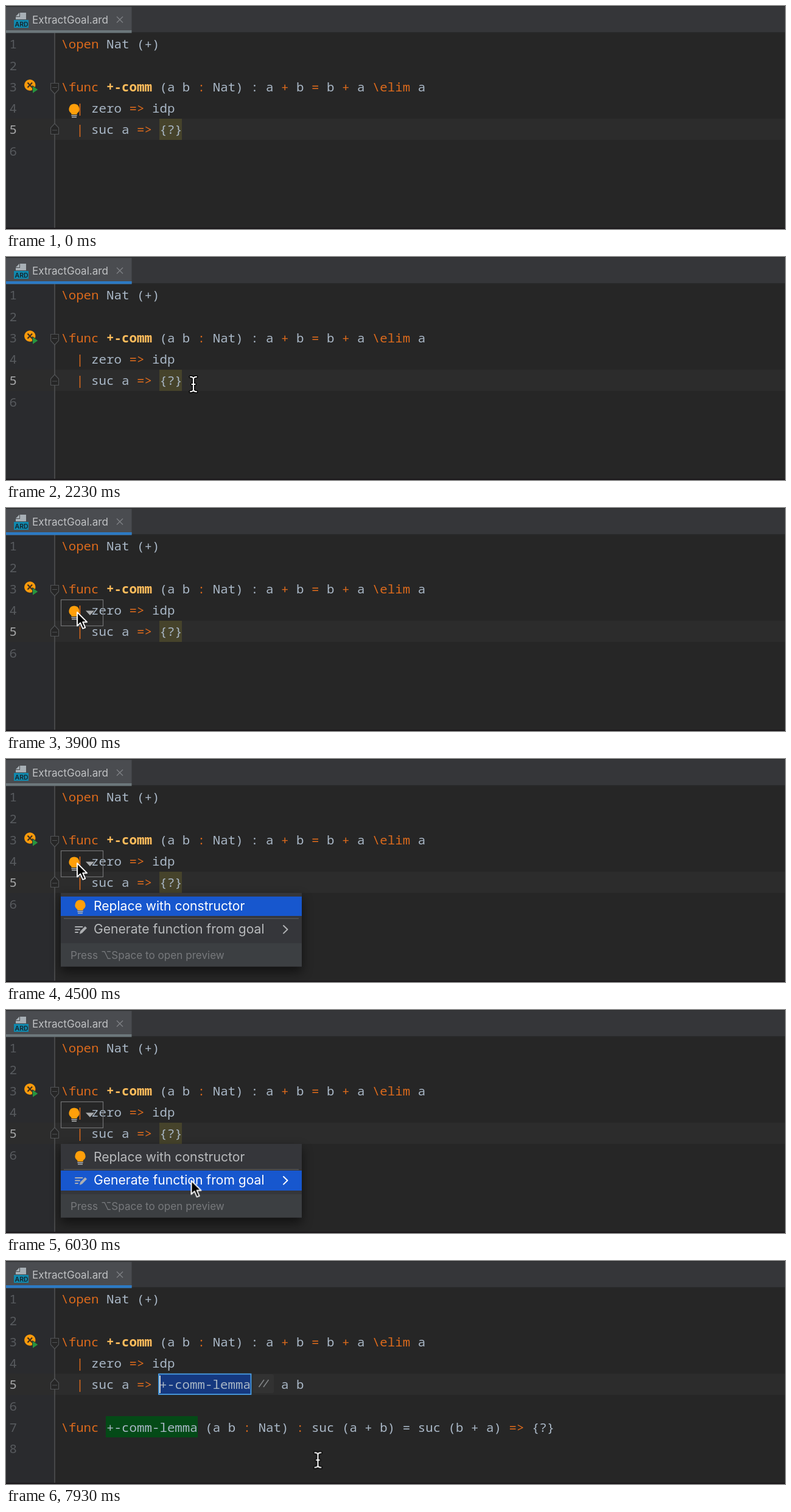
Recreate the animation shown at these times as an HTML page. Size 1280 px wide and 368 px high, loop 8 s.

```html
<!DOCTYPE html>
<html lang="en">
<head>
<meta charset="utf-8">
<title>Generate function from goal</title>
<style>
  html, body { margin: 0; width: 100%; height: 100%; overflow: hidden; background: #262626; }
  svg { display: block; width: 1280px; height: 368px; }
  text { white-space: pre; }
  .code text { font: 500 20.8px "Noto Sans Mono", monospace; fill: #a9b7c6; }
  .code .k { fill: #dc6a1c; }
  .code .f { fill: #ffbd5c; font-weight: 600; }
  .code .num { fill: #575a5e; font-weight: 400; }
  .code .now { fill: #a4a5a6; }
  .ui { font-family: Inter, sans-serif; font-size: 21.1px; fill: #b9bbbd; }
  .sel { fill: #fff; }
  .line { fill: none; stroke-linecap: round; stroke-linejoin: round; }
</style>
</head>
<body>
<svg viewBox="0 0 1280 368">
  <defs>
    <filter id="blur" x="-20%" y="-40%" width="140%" height="180%"><feGaussianBlur stdDeviation="9"/></filter>
    <g id="bulb">
      <path d="M0-9.5A8.6 8.6 0 0 1 4.6 6.3V8H-4.6V6.3A8.6 8.6 0 0 1 0-9.5Z" fill="#ff9f0a"/>
      <path d="M-4.6 9.8H4.6M-4 12.6H4" stroke="#b4b6b8" stroke-width="1.5"/>
    </g>
    <g id="edit" class="line" stroke="#aeb0b3" stroke-width="1.9">
      <path d="M-9-5H2.5M-9-.5H-2M-9 4H-5"/>
      <path d="M-1.5 6L-.5 2 7-5.5 9.5-3 2 4.8Z" fill="#aeb0b3" stroke-width=".8"/>
    </g>
    <path id="fold" d="M-6.5-8.5H6.5V2L0 9-6.5 2Z" fill="#262626" stroke="#505254" stroke-width="1.2"/>
    <path id="beamShape" d="M-5-12.2Q0-12.2 0-8.5Q0-12.2 5-12.2M0-8.5V8.5M-5 12.2Q0 12.2 0 8.5Q0 12.2 5 12.2M-2.5 0H2.5"/>
  </defs>

  <!-- window -->
  <rect width="1280" height="368" fill="#262626"/>
  <rect y="44" width="80" height="324" fill="#2a2b2e"/>
  <rect y="186" width="1280" height="35" fill="#2c2c2c"/>
  <path d="M80 44V368" stroke="#555657" stroke-width="1.4"/>
  <rect width="1280" height="43" fill="#353639"/>
  <path d="M0 .5H1280M0 43.7H1280" stroke="#292a2b" stroke-width="1.2"/>
  <rect y="1.5" width="206.5" height="39" fill="#4a4c50"/>
  <rect y="40" width="206.5" height="4.5" fill="#6c777b"/>
  <rect id="focus" y="40" width="206.5" height="4.5" fill="#2c7ac4"/>
  <path d="M0 367H1280" stroke="#1b181b" stroke-width="2"/>

  <!-- file tab -->
  <path d="M23 11H33V22H16V18H23Z" fill="#a7afb5"/>
  <path d="M16 17L22 11V17Z" fill="#a7afb5"/>
  <rect x="13" y="23" width="24" height="13" fill="#1089ae"/>
  <text class="ui" x="14.5" y="33.8" style="font-size:10.5px;font-weight:600;fill:#17232b">ARD</text>
  <text class="ui" x="43" y="28.7" style="font-size:17.1px;fill:#c0c2c4">ExtractGoal.ard</text>
  <path d="M182 17.5L192 27.5M192 17.5L182 27.5" stroke="#7b7e82" stroke-width="1.5"/>

  <!-- gutter marks -->
  <circle cx="39.3" cy="130.5" r="9.2" fill="#fb9a0b"/>
  <path d="M35.5 126.5L43 134.5M43 126.5L35.5 134.5" stroke="#3f3020" stroke-width="2.2"/>
  <path d="M43.5 131.5L53 138 43.5 144.5Z" fill="#27943f" stroke="#2a2b2e"/>
  <use href="#fold" x="80" y="136"/>
  <use href="#fold" transform="translate(80 203) scale(1 -1)"/>
  <path d="M76 134.5H84M76 205H84" stroke="#505254" stroke-width="1.2"/>

  <g class="code" id="base"></g>
  <g class="code" id="before"><rect x="252" y="186" width="37" height="35" fill="#46432b"/></g>
  <g class="code" id="after">
    <rect x="251" y="186.5" width="151.5" height="33.5" fill="#15387f" stroke="#4a9fe6" stroke-width="1.8"/>
    <path d="M253 189V218" stroke="#c8ccd0" stroke-width="2"/>
    <rect x="406" y="187" width="34" height="31" rx="2" fill="#323232"/>
    <path d="M415.5 208L424 196M423 208L431.5 196" stroke="#7f8284" stroke-width="1.7"/>
    <rect x="164" y="256" width="151" height="35" fill="#044a17"/>
  </g>

  <use id="lamp" href="#bulb" x="112" y="171"/>
  <g id="frame">
    <rect x="90.5" y="151.5" width="69" height="43" fill="none" stroke="#737476" stroke-width="1.2"/>
    <path d="M131 169.5H145L138 177Z" fill="#a9abad"/>
  </g>

  <g id="menu">
    <rect x="90" y="229" width="396" height="122" fill="#000" opacity=".55" filter="url(#blur)"/>
    <rect x="90" y="221" width="396" height="121.5" fill="#35363a"/>
    <rect x="90" y="304" width="396" height="38.5" fill="#3c3f42"/>
    <path d="M95 263.3H481" stroke="#515356" stroke-width="1.4"/>
    <g id="items"></g>
    <text class="ui" x="106" y="329.6" style="font-size:17.1px;fill:#77797c">Press ⌥Space to open preview</text>
  </g>

  <g id="mouse">
    <g id="beam" class="line">
      <use href="#beamShape" stroke="#000" stroke-width="5"/>
      <use href="#beamShape" stroke="#fff" stroke-width="2.1"/>
    </g>
    <path id="arrow" d="M0 0V22.5L5.2 17.6 9.2 27 13.2 25.3 9.2 16.2H16Z" fill="#000" stroke="#fff" stroke-width="1.9" stroke-linejoin="round"/>
    <g id="hand" class="line" stroke="#111" stroke-width="1.4">
      <path fill="#fff" d="M-1.6 1Q0-2.6 2.3.4L5 8.5Q7 6.5 9.2 8.2Q11.5 6.7 13.2 8.8Q16.7 7.7 17.4 11.5L18 17Q17.8 20 16 22.5V25H6.5Q4 21-3 15Q-5.5 12-3 11.2Q-1 11 2 13.8Z"/>
      <path d="M8 17V22M11 17V22M14 17V22"/>
    </g>
  </g>
</svg>

<script>
const LOOP = 8000;
const $ = id => document.getElementById(id);
const add = (id, markup) => $(id).insertAdjacentHTML('beforeend', markup);
const baseline = n => 70.3 + 35.25 * (n - 1);

// <k> marks keywords, <f> marks a defined name
function code(id, n, text, x = 90.2) {
  const spans = text.replace(/<(\w)>(.*?)<\/\w>/g, '<tspan class="$1">$2</tspan>');
  add(id, `<text x="${x}" y="${baseline(n)}">${spans}</text>`);
}
function number(id, n) {
  add(id, `<text class="num ${n === 5 ? 'now' : ''}" x="5.5" y="${baseline(n)}">${n}</text>`);
}

code('base', 1, '<k>\\open</k> Nat (+)');
code('base', 3, '<k>\\func</k> <f>+-comm</f> (a b <k>:</k> Nat) : a <k>+</k> b <k>=</k> b <k>+</k> a <k>\\elim</k> a');
code('base', 4, '  <k>|</k> zero <k>=></k> idp');
code('base', 5, '  <k>|</k> suc a <k>=></k>');
code('before', 5, '{?}', 252.2);
code('after', 5, '+-comm-lemma', 252.2);
code('after', 5, 'a b', 452);
code('after', 7, '<k>\\func</k> +-comm-lemma (a b <k>:</k> Nat) <k>:</k> suc (a + b) = suc (b + a) <k>=></k> {?}');
for (let n = 1; n <= 6; n++) number('base', n);
number('after', 7);
number('after', 8);

const first = cls => `<use href="#bulb" x="122" y="242"/>
  <text class="ui ${cls}" x="144" y="249.6">Replace with constructor</text>`;
const second = cls => `<use href="#edit" x="123" y="282"/>
  <text class="ui ${cls}" x="144" y="288">Generate function from goal</text>
  <path class="line" d="M456 275L462.5 281.3 456 287.6" stroke="${cls ? '#fff' : '#b0b2b4'}" stroke-width="2"/>`;
const bar = (y, h) => `<rect x="90" y="${y}" width="396" height="${h}" fill="#1757ce"/>`;
add('items', first('') + second('') +
  `<g id="pick1">${bar(227, 32)}${first('sel')}</g>` +
  `<g id="pick2">${bar(265, 33)}${second('sel')}</g>`);

const play = (id, frames) => $(id).animate(frames, { duration: LOOP, iterations: Infinity });

// Visible only within the given [from, to) spans
function show(id, ...spans) {
  const on = t => spans.some(([a, b]) => t >= a && t < b) ? 1 : 0;
  const times = [...new Set([0, ...spans.flat(), LOOP])].sort((a, b) => a - b);
  play(id, times.map(t => ({
    offset: t / LOOP, opacity: on(Math.min(t, LOOP - 1)), easing: 'steps(1, end)'
  })));
}

const OPEN = 3960, CLOSE = 7400, DONE = 7470;
show('focus', [1930, OPEN], [CLOSE, LOOP]);
show('lamp', [0, 1930], [3400, CLOSE]);
show('frame', [3660, CLOSE]);
show('menu', [OPEN, CLOSE]);
show('pick1', [OPEN, 4930]);
show('pick2', [4930, CLOSE]);
show('before', [0, DONE]);
show('after', [DONE, LOOP]);
show('beam', [1000, 3630], [CLOSE, LOOP]);
show('arrow', [3630, 4870], [5700, CLOSE]);
show('hand', [4870, 5700]);

const path = [
  [0, 385, 384], [1000, 385, 384, 'ease-out'], [1530, 310, 207.5], [1800, 308, 210],
  [2730, 308, 210, 'ease-in-out'], [3230, 230, 209], [3450, 186, 203],
  [3680, 128, 179, 'ease-out'], [3900, 117, 172],
  [4520, 117, 172, 'ease-in-out'], [5130, 268, 285],
  [5230, 268, 285, 'ease-in-out'], [5950, 304.5, 281.5],
  [7350, 304.5, 281.5, 'ease-in-out'], [7670, 512.5, 328.5], [LOOP, 512.5, 328.5]
];
play('mouse', path.map(([t, x, y, easing = 'linear']) => ({
  offset: t / LOOP, transform: `translate(${x}px, ${y}px)`, easing
})));
</script>
</body>
</html>
```
